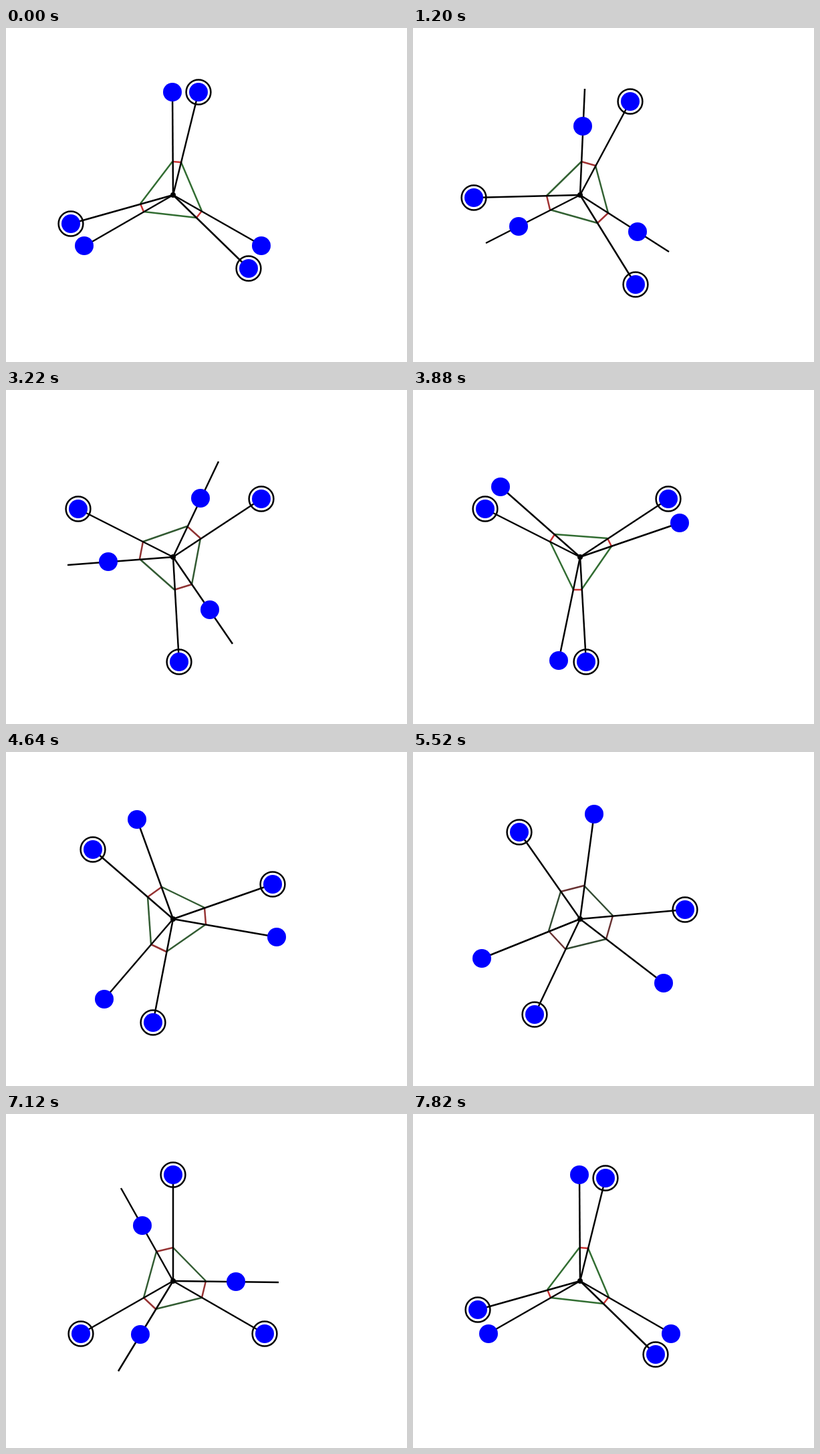
Recreate the animation shown at these times as an HTML page with a canvas. Size 600 by 500 pixels, loop 7.84 s.

```html
<!DOCTYPE html>
<html lang="en">
<head>
<meta charset="utf-8">
<title>Coupled rotors</title>
<style>
html, body { margin: 0; width: 100%; height: 100%; overflow: hidden; background: #fff; }
canvas { display: block; }
</style>
</head>
<body>
<canvas id="stage" width="600" height="500"></canvas>
<script>
const ctx = document.getElementById("stage").getContext("2d");
const LOOP = 7840, ARM = 158.25, JOINT = 50, STEP = 14.18;
// Each swing starts here; the last one restarts the turn from zero.
const starts = [0, 995, 1957, 2961, 3938, 4927, 5916, 6880, LOOP];
const SWING = 985, SLIDE_TIME = 530, SLIDE_SPEED = 0.245;

// Points snap to whole pixels.
const at = (deg, r) => {
  const a = deg * Math.PI / 180;
  return [Math.floor(250 + r * Math.sin(a)), Math.floor(250 - r * Math.cos(a))];
};

function line(p, q, color) {
  ctx.strokeStyle = color;
  ctx.lineWidth = 2.5;
  ctx.beginPath();
  ctx.moveTo(...p);
  ctx.lineTo(...q);
  ctx.stroke();
}

function circle(p, r) {
  ctx.beginPath();
  ctx.arc(...p, r, 0, 2 * Math.PI);
}

// Compressed links turn red, stretched links turn green.
function link(from, to) {
  const length = 2 * JOINT * Math.sin((to - from) * Math.PI / 360);
  const stretch = Math.abs(length) - JOINT;
  const red = 50 + 4 * Math.max(0, -stretch);
  const green = 50 + 2 * Math.max(0, stretch);
  line(at(from, JOINT), at(to, JOINT), `rgb(${red},${green},50)`);
}

function draw(time) {
  const t = (time + 20) % LOOP;
  const n = starts.findIndex(s => s > t) - 1;
  const age = t - starts[n];
  const held = n === 7 ? 0 : STEP * (n + 1);
  const free = held - 60 + (60 - STEP) * Math.cos(Math.PI * age / SWING);
  const reach = ARM - SLIDE_SPEED * Math.max(0, Math.min(age, SLIDE_TIME - age));

  ctx.fillStyle = "#fff";
  ctx.fillRect(0, 0, 600, 500);
  const turns = [0, 120, 240];
  for (const a of turns) {
    link(free + a, held + a);
    link(held + a, free + a + 120);
  }
  for (const a of turns) {
    line([250, 250], at(held + a, ARM), "#000");
    line([250, 250], at(free + a, ARM), "#000");
  }
  ctx.fillStyle = "#000";
  circle([250, 250], 4);
  ctx.fill();
  ctx.fillStyle = "#00f";
  for (const a of turns) {
    circle(at(free + a, reach), 14);
    ctx.fill();
    const p = at(held + a, ARM);
    circle(p, 14);
    ctx.fill();
    ctx.strokeStyle = "#000";
    circle(p, 18.4);
    ctx.stroke();
  }
}

const begin = performance.now();
function tick() {
  draw(performance.now() - begin);
  requestAnimationFrame(tick);
}
tick();
</script>
</body>
</html>
```
